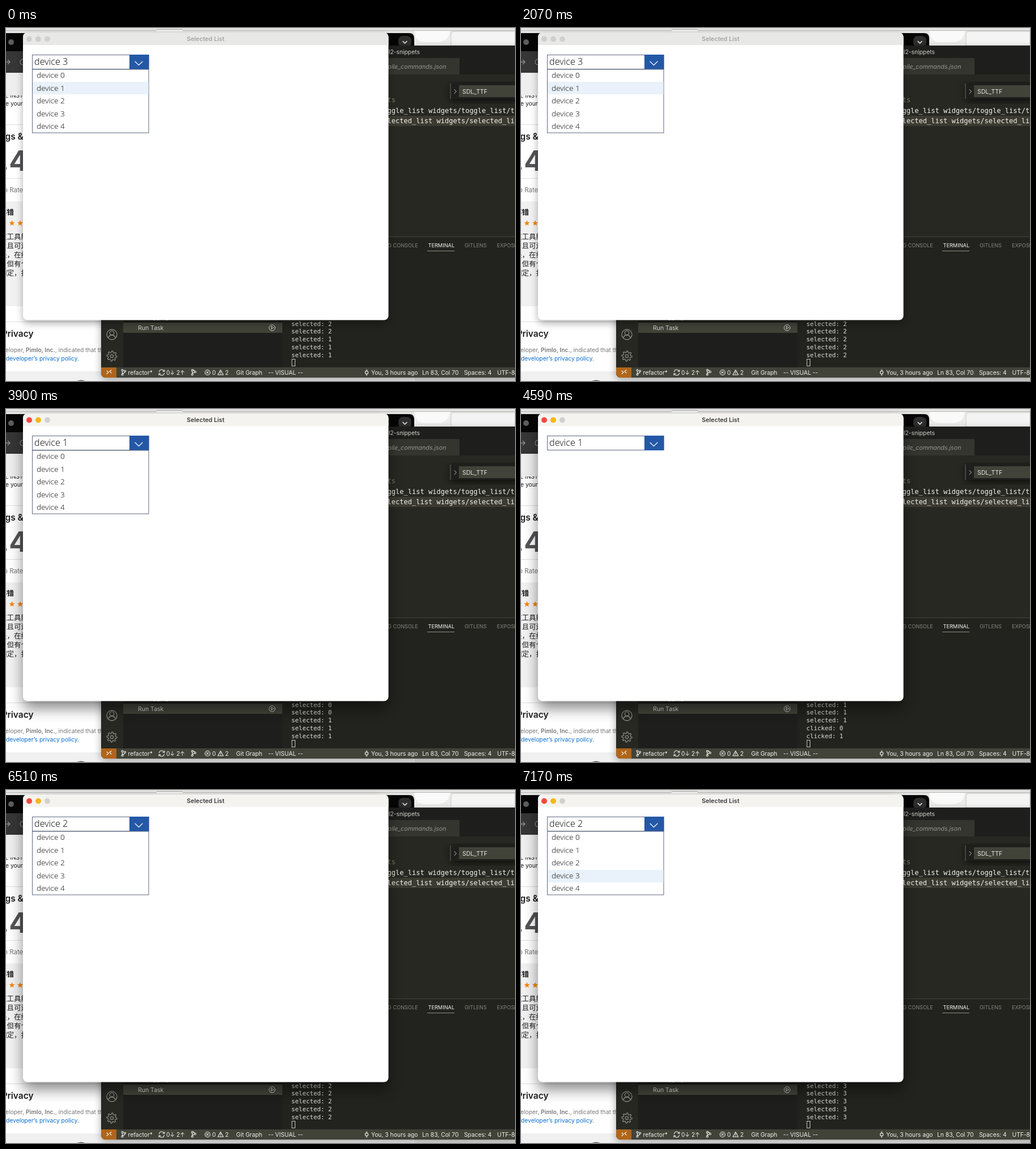
These frames come from a looping animation (899 by 623 pixels, 7.26 s). An HTML page:

```html
<!DOCTYPE html>
<html lang="en">
<head>
<meta charset="utf-8">
<title>Selected List</title>
<style>
html, body { margin: 0; width: 100%; height: 100%; overflow: hidden; background: #e4e4e2; }
svg { display: block; width: 899px; height: 623px; font-family: Inter, Roboto, sans-serif; }
text { white-space: pre; }
.mono { font-family: "DejaVu Sans Mono", monospace; }
.cjk { font-family: "Noto Sans CJK SC", "Noto Sans CJK", sans-serif; }
.ui { font-family: "Open Sans", sans-serif; font-weight: 300; fill: #000; }
.status { font-size: 10.3px; fill: #f1f1ec; }
.tab { font-size: 9.2px; fill: #85857e; }
.tab.on { fill: #f5f5f0; }
.line { fill: none; stroke-linecap: round; stroke-linejoin: round; }
</style>
</head>
<body>
<svg viewBox="0 0 899 623" xmlns="http://www.w3.org/2000/svg">
  <defs>
    <filter id="wide" x="-20%" y="-20%" width="140%" height="140%"><feGaussianBlur stdDeviation="12"/></filter>
    <filter id="soft" x="-20%" y="-20%" width="140%" height="140%"><feGaussianBlur stdDeviation="7"/></filter>
    <clipPath id="editorClip"><rect x="168" y="31" width="760" height="586" rx="8"/></clipPath>
    <clipPath id="windowClip"><rect x="30" y="8" width="645.5" height="507.5" rx="8"/></clipPath>
  </defs>

  <!-- desktop -->
  <rect width="899" height="623" fill="#e4e4e2"/>
  <rect y="4" width="899" height="1" fill="#b9b9b5"/>
  <rect x="266" y="3" width="46" height="3" fill="#f0f0ee"/>
  <path d="M266 2.500h46" stroke="#a8a8a5"/>
  <path d="M720 5h66v26h-66z" fill="#ececeb"/>
  <path d="M722 5h62q-2 20-24 20h-20q-18 0-18-20z" fill="#fafafa"/>
  <path d="M786 31V12q0-6 6-6h107v25z" fill="#f4f4f4" stroke="#c9c9c7"/>

  <!-- browser -->
  <path d="M0 9H712q9 0 9 9v605H0z" fill="#fff"/>
  <path d="M0 9H712q9 0 9 9v23H0z" fill="#060606"/>
  <circle cx="9" cy="25" r="5" fill="#5d5d5d"/>
  <rect x="693" y="14" width="23" height="20" rx="8" fill="#2e2e2e"/>
  <path class="line" d="M701 23.500l3.500 3.500 3.500-3.500" stroke="#eee" stroke-width="1.600"/>
  <rect y="41" width="168" height="38" fill="#363636"/>
  <path class="line" d="M-2 60H7M3.500 56.500L7 60l-3.500 3.500M33 56a5 5 0 1 0 0 8" stroke="#8d8d8d" stroke-width="1.300"/>
  <rect y="79" width="168" height="42" fill="#eeeeef"/>
  <g fill="#1d1d1f">
    <text x="-8" y="123" font-size="10">RE INST</text>
    <rect y="112" width="30" height="7" fill="#eeeeef"/>
    <text x="-1" y="137" font-size="10.300">e your</text>
    <path d="M0 170.500H30M0 265.500H30" stroke="#dededf"/>
    <text x="-11" y="197" font-size="15.500" font-weight="600">ngs &amp;</text>
    <text x="-11" y="252" font-size="49" font-weight="700" fill="#545456">.4</text>
    <text x="-4" y="290" font-size="11.500" fill="#77777a">o Rate</text>
    <rect y="306" width="168" height="185" fill="#f1f1f2"/>
    <g class="cjk" font-size="12.500">
      <text x="-11" y="330" font-weight="700">不错</text>
      <text x="-11" y="373">这工具能</text>
      <text x="-11" y="389">，且可还</text>
      <text x="-11" y="405">是，在约</text>
      <text x="-11" y="421">，但有个</text>
      <text x="-11" y="437">固定，打</text>
    </g>
    <g id="stars" fill="#f4860b"></g>
    <path d="M0 518.500H168" stroke="#dededf"/>
    <text x="-7.500" y="545" font-size="15.500" font-weight="600">Privacy</text>
    <text x="-1" y="572" font-size="10.300" fill="#77777a">eloper, <tspan font-weight="600">Pimlo, Inc.</tspan>, indicated that the</text>
    <text x="0" y="587" font-size="10.300" fill="#0a6dd0">developer’s privacy policy.</text>
  </g>
  <rect y="606" width="720" height="17" fill="#f0f0f0"/>
  <path d="M125 623q8-3 15 0z" fill="#555"/>

  <!-- editor -->
  <rect x="168" y="36" width="760" height="584" rx="8" filter="url(#soft)" opacity=".35"/>
  <g clip-path="url(#editorClip)">
    <rect x="168" y="31" width="731" height="586" fill="#272822"/>
    <rect x="168" y="31" width="731" height="51" fill="#1e1f1c"/>
    <rect x="600" y="53" width="201" height="29" fill="#34352f"/>
    <text x="676" y="46" font-size="10.300" fill="#d2d2cc">l2-snippets</text>
    <text x="665" y="72" font-size="10.700" font-style="italic" fill="#96968c">mpile_commands.json</text>
    <rect x="600" y="155" width="299" height="18" fill="#3b3b32"/>
    <g class="mono" font-size="12.050" fill="#f4f4ee">
      <text x="673.500" y="131" fill="#7b7968">ts</text>
      <text x="673.500" y="149.500">ggle_list widgets/toggle_list/toggle</text>
      <text x="673.500" y="168">lected_list widgets/selected_list/s</text>
    </g>
    <rect x="786" y="100" width="125" height="28" filter="url(#soft)" opacity=".7"/>
    <rect x="784" y="98" width="115" height="27" fill="#1e1f1c"/>
    <path d="M785 98v27" stroke="#45463f" stroke-width="2"/>
    <path class="line" d="M792 108.500l3.500 3.500-3.500 3.500" stroke="#c9c9c4"/>
    <rect x="800" y="101" width="99" height="21" fill="#414339"/>
    <text x="806" y="116" font-size="10.500" fill="#e6e6e0">SDL_TTF</text>

    <rect x="488" y="369" width="411" height="229" fill="#22231e"/>
    <path d="M488 368.500H899" stroke="#44453d"/>
    <text class="tab" x="674" y="386.500">G CONSOLE</text>
    <text class="tab on" x="745.500" y="386.500">TERMINAL</text>
    <path d="M744 393.500h48" stroke="#8f8f84"/>
    <text class="tab" x="810" y="386.500">GITLENS</text>
    <text class="tab" x="867" y="386.500">EXPOSED</text>

    <rect x="168" y="500" width="39" height="99" fill="#272822"/>
    <rect x="207" y="500" width="281" height="99" fill="#1e1f1c"/>
    <text x="233" y="514" font-size="10.500" fill="#ccccc7">Debugging</text>
    <rect x="207" y="520" width="281" height="18" fill="#414339"/>
    <text x="233" y="533" font-size="10.500" fill="#d5d5cf">Run Task</text>
    <g class="line" stroke="#c8c8c2">
      <circle cx="470" cy="529" r="5.300"/>
      <path d="M468.500 526.500v5l4-2.500z"/>
    </g>
    <g class="line" stroke="#8a8a82" stroke-width="1.300">
      <circle cx="187" cy="541" r="9"/>
      <circle cx="187" cy="538" r="3.700"/>
      <path d="M180.500 547q2-5 6.500-5t6.500 5"/>
      <circle cx="187" cy="579" r="2.700"/>
      <path id="gear"/>
    </g>

    <g id="log" class="mono" font-size="10.800" fill="#deded8"></g>
    <rect x="505" y="584.500" width="5.500" height="12" fill="none" stroke="#c9c9c3"/>

    <rect x="168" y="599" width="731" height="18" fill="#414339"/>
    <rect x="168" y="599" width="27" height="18" fill="#b0651a"/>
    <g class="line" stroke="#f1f1ec" stroke-width="1.100">
      <path d="M178 605l3 2.500-3 3M186 603.500l-3 2.500 3 3"/>
      <circle cx="205.500" cy="604" r="1.500"/><circle cx="205.500" cy="611.500" r="1.500"/><circle cx="210" cy="605.500" r="1.500"/>
      <path d="M205.500 605.500v4.500M210 607q0 2-4 2.500"/>
      <path d="M270.500 607a4.500 4.500 0 0 1 8.500-1.500M279.500 609a4.500 4.500 0 0 1-8.500 1.500M277 606h3v-2.500M273 610h-3v2.500"/>
      <circle cx="329" cy="604" r="1.500"/><circle cx="334" cy="607" r="1.500"/><circle cx="329" cy="611.500" r="1.500"/>
      <path d="M329 605.500v4.500M332.500 607.500l-3.500 2M330 603l4 2.500"/>
      <circle cx="356" cy="608" r="4.500"/><path d="M354.300 606.300l3.400 3.400M357.700 606.300l-3.400 3.400"/>
      <path d="M379 603.500l4.800 8.500h-9.600zM379 606.500v2.500M379 610.500v.200"/>
      <circle cx="637" cy="608" r="2.600"/><path d="M637 602.500v2.900M637 610.600v2.900"/>
    </g>
    <g class="status">
      <text x="215.500" y="611.500">refactor*</text>
      <text x="283" y="611.500">0↓ 2↑</text>
      <text x="364" y="611.500">0</text>
      <text x="387" y="611.500">2</text>
      <text x="406.500" y="611.500">Git Graph</text>
      <text x="463" y="611.500">-- VISUAL --</text>
      <text x="645" y="611.500">You, 3 hours ago</text>
      <text x="735" y="611.500">Ln 83, Col 70</text>
      <text x="809" y="611.500">Spaces: 4</text>
      <text x="867.500" y="611.500">UTF-8</text>
    </g>
  </g>

  <!-- front window -->
  <rect id="shade" x="30" width="645" height="507" rx="9"/>
  <g clip-path="url(#windowClip)">
    <rect x="30" y="8" width="646" height="508" fill="#fff"/>
    <rect id="bar" x="30" y="8" width="646" height="22"/>
  </g>
  <circle id="red" cx="41" cy="19.500" r="5"/>
  <circle id="yellow" cx="57" cy="19.500" r="5"/>
  <circle cx="73" cy="19.500" r="5" fill="#d2d1d0"/>
  <text id="title" x="352.500" y="22.500" font-size="10.700" font-weight="600" text-anchor="middle">Selected List</text>

  <rect x="46.500" y="47.500" width="205.500" height="25" fill="#fff" stroke="#5f6880"/>
  <rect x="218" y="47" width="34.500" height="26" fill="#2458a6"/>
  <path class="line" d="M228 59.200l6.500 6.300 6.500-6.300" stroke="#e9eff8" stroke-width="1.400"/>
  <text id="label" class="ui" x="50" y="65" font-size="16.200"></text>
  <g id="list">
    <rect x="46.500" y="73" width="205.500" height="112" fill="#fff" stroke="#5f6880"/>
    <rect id="hover" x="47" width="204.500" height="22" fill="#e9f2fa"/>
    <g id="items" class="ui" font-size="13.600"></g>
  </g>
  <path id="cursor" d="M0 0V12.500L2.900 9.900 4.800 14 6.800 13.100 5 9.100H9z" fill="#000" stroke="#fff" stroke-width=".8"/>
</svg>
<script>
const LOOP = 7260;
const $ = id => document.getElementById(id);

function add(parent, tag, attrs, content = "") {
  const el = document.createElementNS("http://www.w3.org/2000/svg", tag);
  for (const key in attrs) el.setAttribute(key, attrs[key]);
  el.textContent = content;
  parent.append(el);
  return el;
}

function ring(n, cx, cy, radius) {
  return "M" + Array.from({ length: n }, (_, i) => {
    const a = i * 2 * Math.PI / n - Math.PI / 2, r = radius(i);
    return (cx + r * Math.cos(a)).toFixed(2) + " " + (cy + r * Math.sin(a)).toFixed(2);
  }).join("L") + "z";
}

for (const x of [-4, 10.5, 25]) add($("stars"), "path", { d: ring(10, x, 344.5, i => i % 2 ? 2.3 : 5.5) });
$("gear").setAttribute("d", ring(32, 187, 579, i => i % 4 < 2 ? 9 : 6.5));
for (let i = 0; i < 5; i++) add($("items"), "text", { x: 54, y: 88 + 22.6 * i }, "device " + i);
const rows = Array.from({ length: 5 }, (_, i) => add($("log"), "text", { x: 504, y: 525.5 + 13.75 * i }));

// Each event is [time, printed log, state changes]; "c" marks a click.
const events = [
  [0, "22111", { hover: 1, label: 3, open: true, focus: false, cursor: null }],
  [540, "2", { hover: 2 }],
  [960, "2", { hover: 1 }], [990, "1"], [1020, "1"],
  [1050, "1", { hover: 0 }], [1080, "00"], [1110, "00"],
  [1410, "0", { hover: 1 }], [1440, "11"],
  [1800, "1", { hover: 2 }], [1830, "22"], [1860, "222"],
  [2070, "", { hover: 1 }], [2100, "1"], [2130, "1"],
  [2430, "", { focus: true }],
  [2640, "0", { hover: 0 }], [2670, "00"], [2730, "00"],
  [2880, "", { hover: 1 }], [2940, "1"], [2970, "1"], [3000, "1"],
  [3270, "", { open: false, label: 1 }],
  [3420, "", { cursor: "187 100" }], [3480, "", { cursor: null }],
  [3900, "", { open: true, hover: -1 }], [3930, "c0"],
  [4140, "c1", { open: false }],
  [4230, "", { cursor: "228 63" }], [4590, "", { cursor: null }],
  [5070, "", { open: true }], [5100, "c0"],
  [5310, "", { hover: 0 }], [5340, "00"],
  [5370, "0", { hover: 1 }], [5400, "1"],
  [5430, "11", { hover: 2 }], [5460, "22"], [5490, "22"],
  [5820, "2"], [5910, "", { open: false, label: 2 }],
  [6510, "", { open: true, hover: -1 }], [6540, "c0"],
  [6600, "", { hover: 0 }], [6630, "0"],
  [6660, "0", { hover: 1 }], [6690, "11"],
  [6720, "1", { hover: 2 }], [6750, "2"],
  [6780, "2", { hover: 3 }], [6810, "3"], [6840, "33"], [6870, "3"],
  [6900, "3", { hover: 4 }], [6930, "4"], [6960, "44"], [6990, "4"],
  [7050, "4", { hover: 3 }], [7080, "3"], [7110, "3"], [7140, "3"], [7170, "33"]
];

function stateAt(time) {
  const state = {};
  let log = "";
  for (const [at, printed, change] of events) {
    if (at > time) break;
    log += printed;
    Object.assign(state, change);
  }
  state.lines = log.match(/c?\d/g).slice(-5);
  return state;
}

function draw(time) {
  const s = stateAt(time);
  const set = (id, attr, value) => $(id).setAttribute(attr, value);
  const show = (id, on) => set(id, "visibility", on ? "inherit" : "hidden");

  set("shade", "y", s.focus ? 22 : 14);
  set("shade", "opacity", s.focus ? 0.45 : 0.32);
  set("shade", "filter", s.focus ? "url(#wide)" : "url(#soft)");
  set("bar", "fill", s.focus ? "#f4f3f0" : "#e8e8e7");
  set("red", "fill", s.focus ? "#f5483f" : "#d0cfce");
  set("yellow", "fill", s.focus ? "#f6b71b" : "#d0cfce");
  set("title", "fill", s.focus ? "#3c3c3b" : "#a5a5a4");

  $("label").textContent = "device " + s.label;
  show("list", s.open);
  show("hover", s.hover >= 0);
  set("hover", "y", Math.round(72.7 + 22.6 * Math.max(0, s.hover)));
  show("cursor", s.cursor);
  if (s.cursor) set("cursor", "transform", `translate(${s.cursor})`);
  s.lines.forEach((line, i) => {
    rows[i].textContent = (line[0] === "c" ? "clicked: " : "selected: ") + line.slice(-1);
  });
}

const start = performance.now();
function tick() {
  draw((performance.now() - start) % LOOP);
  requestAnimationFrame(tick);
}
tick();
</script>
</body>
</html>
```
